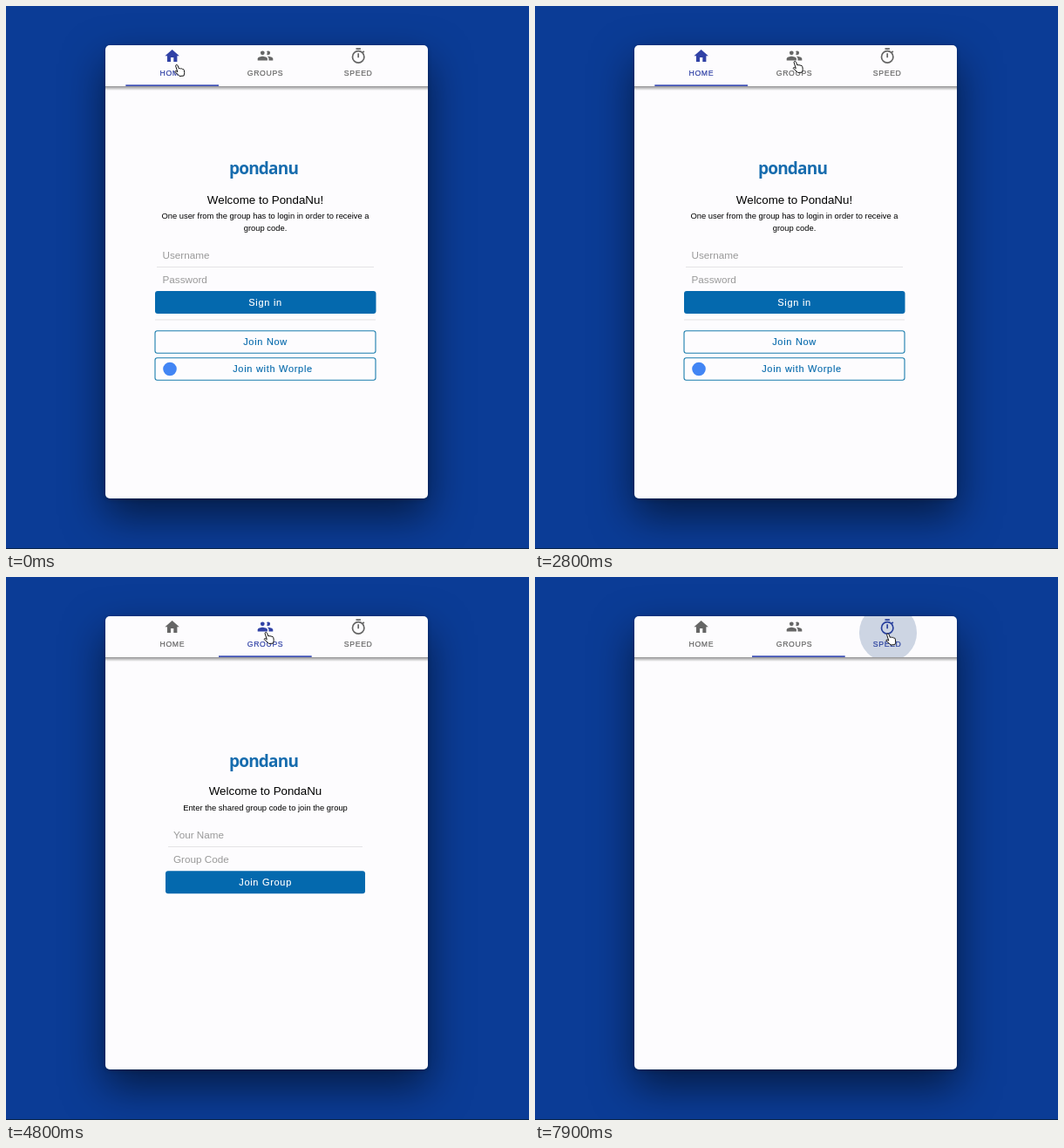
Write an HTML page that moves like this. It is 600 px wide and 623 px high and loops after 8000 ms.

```html
<!DOCTYPE html>
<html lang="en">
<head>
<meta charset="utf-8">
<title>Group sign-in</title>
<style>
  html, body { margin: 0; width: 100%; height: 100%; overflow: hidden; background: #0b3c96; }
  .card { position: absolute; left: 114px; top: 45px; width: 370px; height: 520px; border-radius: 5px;
    background: #fdfcfe; box-shadow: 0 20px 48px rgba(0,0,0,.55), 0 1px 4px rgba(0,0,0,.3); }
  .edge { position: absolute; left: 0; top: 622px; width: 600px; height: 1px; background: #092348; }
  svg { position: absolute; left: 0; top: 0; display: block; }
  text { font-family: "Liberation Sans", Arial, sans-serif; }
  .mid { text-anchor: middle; }
  .logo { font: 700 19px "Open Sans", "Noto Sans", sans-serif; letter-spacing: -.8px; fill: #176cae; }
  .title { font-size: 13.35px; }
  .note { font-size: 9.4px; }
  .field { font-size: 11.7px; fill: #999; }
  .btn { font-size: 11px; letter-spacing: .7px; fill: #0a6cad; stroke: #0a6cad; stroke-width: .15px; }
  .btn.on { fill: #fff; stroke: #fff; }
  .fill { fill: #0469ae; }
  .outline { fill: none; stroke: #1a7dad; stroke-width: 1.1px; }
  .rule { fill: #e4e3e6; }
  .tab { fill: #666; stroke: #666; color: #666; }
  .tab.active { fill: #3142a6; stroke: #3142a6; color: #3142a6; }
  .tab text { font-size: 8.7px; letter-spacing: .65px; stroke-width: .2px; }
  .icon { stroke: none; }
</style>
</head>
<body>
<div class="card"></div>
<div class="edge"></div>
<svg width="600" height="623" viewBox="0 0 600 623">
  <defs>
    <clipPath id="cardClip"><rect x="114" y="45" width="370" height="520" rx="5"/></clipPath>
    <clipPath id="tabClip"><rect id="tabBox" y="45" width="106.7" height="47"/></clipPath>
    <linearGradient id="barShade" x2="0" y2="1">
      <stop offset="0" stop-color="#000" stop-opacity=".42"/>
      <stop offset=".4" stop-color="#000" stop-opacity=".25"/>
      <stop offset="1" stop-color="#000" stop-opacity="0"/>
    </linearGradient>
  </defs>

  <g clip-path="url(#cardClip)">
    <g id="home">
      <text class="logo" x="256" y="193">pondanu</text>
      <text class="title mid" x="297.5" y="226.5">Welcome to PondaNu!</text>
      <text class="note mid" x="297.5" y="244">One user from the group has to login in order to receive a</text>
      <text class="note mid" x="297.5" y="257.5">group code.</text>
      <text class="field" x="179.5" y="290">Username</text>
      <rect class="rule" x="173" y="299" width="249" height="1"/>
      <text class="field" x="179.5" y="317.5">Password</text>
      <rect class="fill" x="171" y="327" width="253.5" height="26" rx="3"/>
      <text class="btn on mid" x="297.6" y="344">Sign in</text>
      <rect class="rule" x="171" y="359.5" width="253" height="1"/>
      <rect class="outline" x="171" y="372.7" width="253" height="25.5" rx="2.5"/>
      <text class="btn mid" x="297.6" y="389">Join Now</text>
      <rect class="outline" x="171" y="403.7" width="253" height="25.5" rx="2.5"/>
      <circle cx="188" cy="416.5" r="7.8" fill="#4285f4"/>
      <text class="btn mid" x="306" y="419.7">Join with Worple</text>
    </g>
    <g id="groups">
      <text class="logo" x="256" y="218">pondanu</text>
      <text class="title mid" x="297.5" y="250">Welcome to PondaNu</text>
      <text class="note mid" x="297.5" y="268">Enter the shared group code to join the group</text>
      <text class="field" x="192" y="300">Your Name</text>
      <rect class="rule" x="186" y="309" width="223" height="1"/>
      <text class="field" x="192" y="327.5">Group Code</text>
      <rect class="fill" x="183" y="337.3" width="229" height="26" rx="3"/>
      <text class="btn on mid" x="297.6" y="354">Join Group</text>
    </g>

    <rect x="114" y="92" width="370" height="5" fill="url(#barShade)"/>

    <g class="tab">
      <path class="icon" transform="translate(180.8 47.5) scale(.82)" d="M10 20v-6h4v6h5v-8h3L12 3 2 12h3v8z"/>
      <text class="mid" x="190.8" y="80.2">HOME</text>
    </g>
    <g class="tab">
      <g class="icon" transform="translate(287.9 47.4) scale(.8)">
        <circle cx="8" cy="8" r="3"/>
        <path d="M1 19v-2.500C1 14.200 5.700 13 8 13s7 1.200 7 3.500V19z"/>
        <path d="M16 5a3 3 0 0 1 0 6a3 3 0 0 1-2-.8q2-2.200 0-4.400A3 3 0 0 1 16 5z"/>
        <path d="M15 13c2.500-.2 8 1 8 3.500V19h-6v-2.500q0-2.200-2-3.500z"/>
      </g>
      <text class="mid" x="297.5" y="80.2">GROUPS</text>
    </g>
    <g class="tab">
      <g fill="none" stroke-width="1.7">
        <circle cx="404.2" cy="58.400" r="6.700"/>
        <path d="M401.500 49.200h5.400M404.200 54.300v5M409.300 53.300l1.500-1.500"/>
      </g>
      <text class="mid" x="404.2" y="80.2">SPEED</text>
    </g>

    <rect id="ink" y="90.300" width="106.7" height="1.700" fill="#3f51b5"/>
    <g clip-path="url(#tabClip)"><circle id="ripple" cy="64" fill="#0f3c7d"/></g>
  </g>

  <path id="hand" fill="#fff" stroke="#111" stroke-width="1" stroke-linejoin="round"
    d="M-.9 1.200Q-.9 0 .3 0Q1.300 0 1.700 1.200L2.800 4.400Q4 3.500 4.900 4.500Q6.200 3.800 6.900 4.900Q8.400 4.500 8.800 6.200L9.200 9Q9.200 10.400 8.400 12.600L3.500 13Q2.200 10.900-.4 9.400Q-2.400 7.900-1.400 7.200Q-.5 6.700 1.300 8.100Z"/>
</svg>

<script>
const LOOP = 8000, STEP = 100, TAB = 106.7, LEFT = 137.3, PAGE = 370;
const RIPPLE_TIME = 550, RIPPLE_SIZE = 62;

// A press starts the ripple; its release switches the tab.
const clicks = [
  { tab: 1, down: 2825, up: 2932, x: 298 },
  { tab: 2, down: 7700, up: 7861, x: 405 }
];
const handPath = [
  [0, 195.5, 67.5], [2200, 195.5, 67.5], [2700, 298, 63.5],
  [6500, 298, 63.5], [7000, 397.5, 65], [7200, 397.5, 65], [7500, 404.5, 65]
];

const $ = id => document.getElementById(id);
const tabs = document.querySelectorAll(".tab");
const clamp = v => Math.min(1, Math.max(0, v));

function bezier(x1, y1, x2, y2) {
  const at = (a, b, s) => 3 * (1 - s) * (1 - s) * s * a + 3 * (1 - s) * s * s * b + s * s * s;
  return v => {
    if (v <= 0 || v >= 1) return clamp(v);
    let lo = 0, hi = 1;
    for (let i = 0; i < 24; i++) {
      const s = (lo + hi) / 2;
      if (at(x1, x2, s) < v) lo = s; else hi = s;
    }
    return at(y1, y2, lo);
  };
}
const standard = bezier(.4, 0, .2, 1);
const swipe = bezier(.15, .3, .25, 1);

function handAt(t) {
  let i = handPath.length - 1;
  while (handPath[i][0] > t) i--;
  const a = handPath[i], b = handPath[i + 1] || a;
  const p = a === b ? 0 : standard((t - a[0]) / (b[0] - a[0]));
  return [1, 2].map(k => a[k] + (b[k] - a[k]) * p);
}

function drawRipple(t) {
  const c = clicks.filter(c => t >= c.down).pop();
  const ripple = $("ripple");
  if (!c) return ripple.setAttribute("r", 0);
  const grow = standard((t - c.down) / RIPPLE_TIME);
  const fade = 1 - standard((t - c.up) / RIPPLE_TIME);
  ripple.setAttribute("cx", c.x);
  ripple.setAttribute("r", RIPPLE_SIZE * grow);
  ripple.setAttribute("opacity", (.1 + .2 * grow) * fade);
  $("tabBox").setAttribute("x", LEFT + TAB * c.tab);
}

function draw(t) {
  let active = 0, ink = 0;
  for (const c of clicks) {
    if (t >= c.up) active = c.tab;
    ink += standard((t - c.up) / 300);
  }
  tabs.forEach((el, i) => el.classList.toggle("active", i === active));
  $("ink").setAttribute("x", LEFT + TAB * ink);
  $("home").style.display = active === 0 ? "" : "none";
  $("groups").style.display = active === 1 ? "" : "none";
  const slide = PAGE * (1 - swipe((t - clicks[0].up - 53) / 350));
  $("groups").setAttribute("transform", `translate(${slide} 0)`);
  drawRipple(t);
  $("hand").setAttribute("transform", `translate(${handAt(t)})`);
}

const start = performance.now();
function tick() {
  const t = (performance.now() - start) % LOOP;
  draw(Math.floor(t / STEP) * STEP);
  requestAnimationFrame(tick);
}
tick();
</script>
</body>
</html>
```
